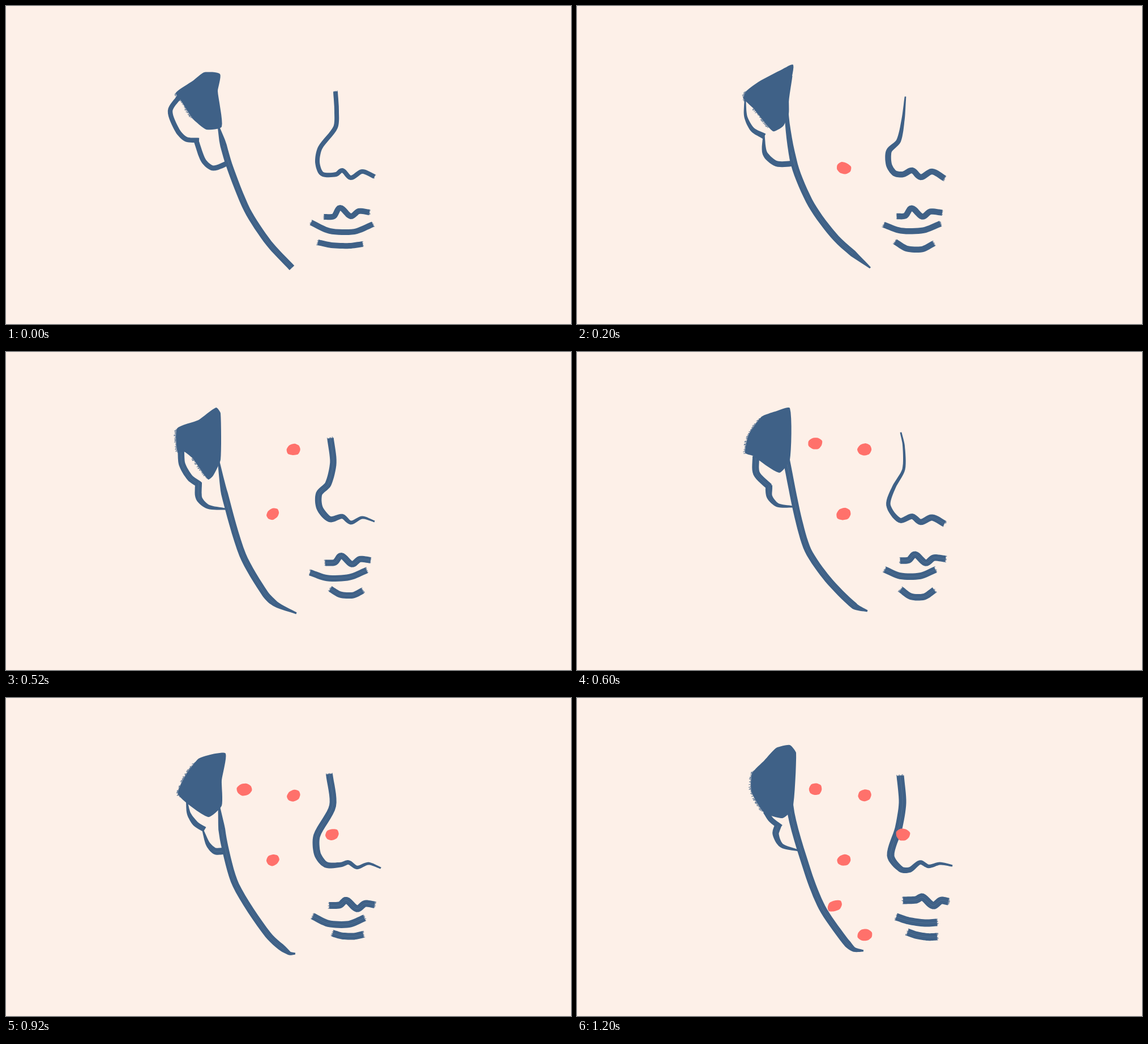
An HTML page that plays this animation: 998 px wide and 561 px high, repeating every 1400 ms.

```html
<!DOCTYPE html>
<html lang="en">
<head>
<meta charset="utf-8">
<title>Brush portrait</title>
<style>
html, body { margin: 0; width: 100%; height: 100%; overflow: hidden; background: #fdf0e8; }
svg { display: block; width: 100%; height: 100%; }
</style>
</head>
<body>
<svg id="stage" viewBox="0 0 998 561"></svg>
<script>
const INK = '#3f6187', SPOT = '#ff716b', HOLD = 200;

// Key points of each redrawn pose. A stroke is [width, taper in, taper out, points].
// bow: left x, y, peak x. nostril: first crest x, tail y. lip and chin: both ends and sag.
const poses = [
  {
    hair: '300 153 330 132 350 117 378 120 374 150 381 213 354 218 330 199 308 165',
    ear: [[8.5, 0, 0, '306 160 290 185 303 220 318 235 341 237'], [9, 0, 0, '336 238 349 273 366 286 396 275']],
    jaw: [11.5, 30, 0, '375 212 394 280 426 360 464 418 505 462'],
    nose: [8, 0, 0, '582 151 584 185 582 214 555 250 550 275 558 296 583 297'],
    nostril: [594, 301], bow: [562, 372, 590], lip: [539, 382, 648, 385, 14], chin: [551, 417, 630, 420, 4]
  },
  {
    hair: '294 163 299 150 322 133 362 112 382 104 374 150 374 190 364 212 346 221 312 181',
    ear: [[10, 80, 0, '297 163 298 195 310 218 331 230'], [10, 40, 0, '330 226 332 260 352 278 381 278']],
    jaw: [12, 150, 40, '379 123 370 185 384 280 414 351 458 410 518 462'],
    nose: [10.5, 110, 0, '580 160 576 200 568 238 551 256 551 280 561 295 576 297'],
    nostril: [592, 304], bow: [565, 371, 591], lip: [542, 386, 642, 384, 11], chin: [562, 416, 630, 419, 11]
  },
  {
    hair: '302 135 340 120 371 98 379 108 379 190 366 218 357 225 330 188 315 176 303 177',
    ear: [[11.5, 0, 0, '309 174 311 198 325 222 342 234'], [12, 0, 60, '340 230 341 258 357 273 388 277']],
    jaw: [12, 60, 50, '375 190 386 250 418 358 458 427 477 445 513 461'],
    nose: [11.5, 0, 100, '573 152 578 195 569 233 553 250 554 275 572 295'],
    nostril: [594, 299], bow: [564, 372, 592], lip: [537, 389, 637, 385, 11], chin: [573, 418, 630, 421, 9]
  },
  {
    hair: '297 178 303 146 326 114 350 105 376 99 376 190 357 213 310 183',
    ear: [[12, 0, 0, '316 184 317 214 340 238'], [12, 0, 60, '339 235 340 255 354 270 381 273']],
    jaw: [12, 0, 25, '370 191 390 290 408 350 443 401 490 448 513 457'],
    nose: [11.5, 240, 0, '572 142 577 165 577 207 560 238 550 270 570 297'],
    nostril: [592, 303], bow: [571, 368, 597], lip: [544, 384, 633, 384, 11], chin: [572, 419, 631, 420, 12]
  },
  {
    hair: '304 170 318 135 340 107 365 99 388 98 381 145 381 190 357 210',
    ear: [[9.5, 40, 0, '319 180 323 204 335 222 351 232'], [12, 45, 0, '348 234 357 258 369 270 384 270']],
    jaw: [12, 40, 25, '376 190 385 255 406 330 463 418 500 450 511 451'],
    nose: [12, 0, 120, '571 134 577 190 549 243 550 275 565 294 592 294'],
    nostril: [605, 300], bow: [571, 366, 601], lip: [542, 385, 633, 388, 12], chin: [577, 415, 631, 417, 4]
  },
  {
    hair: '303 176 314 152 347 101 365 93 388 92 382 148 388 168 370 203 340 203',
    ear: [[10, 0, 25, '319 186 330 212 356 224'], [12.5, 0, 50, '349 224 357 251 383 265']],
    jaw: [12, 60, 0, '376 182 383 255 398 315 432 380 475 422 495 447'],
    nose: [12.5, 0, 120, '569 135 577 190 568 228 551 252 557 284 585 296'],
    nostril: [604, 294], bow: [577, 361, 610], lip: [556, 385, 632, 392, 3], chin: [583, 415, 632, 415, 4]
  },
  {
    hair: '308 165 309 133 331 110 352 88 376 83 387 97 381 195 363 212 330 202',
    ear: [[9.5, 0, 0, '333 200 343 215 360 228'], [12, 0, 60, '355 225 351 240 361 260 391 269']],
    jaw: [12.5, 90, 30, '385 96 376 190 408 308 433 370 470 424 488 443 506 446'],
    nose: [13, 0, 130, '571 137 575 185 568 230 554 278 572 302 588 303'],
    nostril: [606, 296], bow: [576, 357, 610], lip: [564, 386, 636, 396, 4], chin: [584, 413, 636, 421, 3]
  }
];

// One more mark joins with every pose.
const spots = [[471, 286], [508, 172], [421, 161], [576, 241], [508, 418], [455, 367]];

const points = text => text.match(/\d+ \d+/g).map(p => p.split(' ').map(Number));
const line = pts => pts.map(p => p[0].toFixed(1) + ' ' + p[1].toFixed(1)).join('L');
const dist = (a, b) => Math.hypot(b[0] - a[0], b[1] - a[1]);

function heading(a, b) {
  const len = dist(a, b) || 1;
  return [(b[0] - a[0]) / len, (b[1] - a[1]) / len];
}

function seeded(seed) {
  return () => (seed = (seed * 16807) % 2147483647) / 2147483647;
}

// Smooth curve whose tangents scale with each segment, so uneven spacing never overshoots.
function spline(pts, pull, closed) {
  const n = pts.length, out = [];
  const at = i => pts[closed ? (i + n) % n : Math.max(0, Math.min(n - 1, i))];
  for (let i = 0; i < (closed ? n : n - 1); i++) {
    const b = at(i), c = at(i + 1), reach = dist(b, c) * pull;
    const from = heading(at(i - 1), c), to = heading(b, at(i + 2));
    for (let u = 0; u < 1; u += 0.125) {
      const u2 = u * u, u3 = u2 * u, ease = 3 * u2 - 2 * u3;
      out.push([0, 1].map(k => b[k] + (c[k] - b[k]) * ease +
        reach * ((u3 - 2 * u2 + u) * from[k] + (u3 - u2) * to[k])));
    }
  }
  if (!closed) out.push(pts[n - 1]);
  return out;
}

function add(parent, tag, attrs) {
  const el = document.createElementNS('http://www.w3.org/2000/svg', tag);
  for (const key in attrs) el.setAttribute(key, attrs[key]);
  return parent.appendChild(el);
}

const bristles = (g, d) => add(g, 'path', { d, stroke: INK, 'stroke-width': 1.2, opacity: 0.8 });

function brush(g, width, taperIn, taperOut, keys, rand) {
  const pts = spline(keys, 0.8, false), last = pts.length - 1;
  const run = [0];
  for (let i = 1; i <= last; i++) run.push(run[i - 1] + dist(pts[i - 1], pts[i]));
  const press = (s, taper) => taper ? Math.min(1, 0.25 + 0.75 * s / taper) : 1;
  const widths = run.map(s => width * Math.min(press(s, taperIn), press(run[last] - s, taperOut)));
  const dirs = pts.map((p, i) => heading(pts[Math.max(0, i - 1)], pts[Math.min(last, i + 1)]));
  const edge = k => pts.map(([x, y], i) => [x - dirs[i][1] * widths[i] * k, y + dirs[i][0] * widths[i] * k]);
  add(g, 'path', { d: 'M' + line(edge(0.5)) + 'L' + line(edge(-0.5).reverse()) + 'Z', fill: INK });

  // Dry trace where the brush is pressed wide.
  const wide = pts.filter((p, i) => widths[i] > 10.5);
  if (wide.length) add(g, 'path', { d: 'M' + line(wide), fill: 'none', stroke: '#7890ab', 'stroke-width': 0.8, opacity: 0.4 });

  if (!rand) return;
  let hairs = '';
  for (const [i, sign] of [[0, -1], [last, 1]]) {
    const [x, y] = pts[i], [dx, dy] = dirs[i], half = widths[i] / 2;
    for (let o = 0.7 - half; o < half; o += 1.5) {
      const reach = sign * rand() * half * 0.4;
      hairs += `M${x - dy * o} ${y + dx * o}l${dx * reach} ${dy * reach}`;
    }
  }
  bristles(g, hairs);
}

// Filled hair whose left-facing edge frays outward.
function hair(g, text, rand) {
  const pts = spline(points(text), 0.5, true);
  add(g, 'path', { d: 'M' + line(pts) + 'Z', fill: INK });
  let d = '';
  pts.forEach((a, i) => {
    const b = pts[(i + 1) % pts.length], [dx, dy] = heading(a, b);
    if (dy > -0.75) return;
    for (let s = 0; s < dist(a, b); s += 1.8) d += `M${a[0] + dx * s} ${a[1] + dy * s}l${-rand() * 4} ${rand()}`;
  });
  bristles(g, d);
}

function bow([x, y, peak], i) {
  const top = y - 16 + 1.7 * i;
  return [[x, y], [peak - 11, y - 1], [peak, top], [peak + 19, top + 15], [peak + 33, top + 6], [x + 80, top + 8]];
}

function sagging([x1, y1, x2, y2, sag]) {
  return [0, 0.3, 0.7, 1].map(u => [x1 + (x2 - x1) * u, y1 + (y2 - y1) * u + (u % 1 ? sag : 0)]);
}

const nostril = ([x, y], i) => [[x, 290], [x + 15, 303 - i], [x + 35, 292], [x + 57, y]];

// Rounded dab with a wobbling edge.
function spot(g, [x, y], rand) {
  const w = 10.5 + rand() * 3, h = 8.5 + rand() * 2, turn = (rand() - 0.7) * 0.8;
  const rim = Array.from({ length: 8 }, (_, k) => {
    const a = (k + 0.5) * Math.PI / 4, r = 1 + rand() * 0.16;
    const px = Math.cos(a) * w * r, py = Math.sin(a) * h * r;
    return [x + px * Math.cos(turn) - py * Math.sin(turn), y + px * Math.sin(turn) + py * Math.cos(turn)];
  });
  add(g, 'path', { d: 'M' + line(spline(rim, 0.7, true)) + 'Z', fill: SPOT });
}

const stage = document.getElementById('stage');

const layers = poses.map((pose, i) => {
  const g = add(stage, 'g', { visibility: 'hidden' }), rand = seeded(977 + i * 131);
  for (const [w, a, b, text] of [...pose.ear, pose.jaw]) brush(g, w, a, b, points(text));
  hair(g, pose.hair, rand);
  const [w, a, b, text] = pose.nose;
  brush(g, w, a, b, [...points(text), ...nostril(pose.nostril, i)], rand);
  const mouth = 10 + 0.5 * i;
  for (const keys of [bow(pose.bow, i), sagging(pose.lip), sagging(pose.chin)]) brush(g, mouth, 0, 0, keys, rand);
  spots.slice(0, i).forEach(p => spot(g, p, rand));
  return g;
});

function draw(time) {
  const now = Math.floor(time / HOLD) % layers.length;
  layers.forEach((g, i) => g.setAttribute('visibility', i === now ? 'visible' : 'hidden'));
}

const start = performance.now();
function tick() {
  draw(performance.now() - start);
  requestAnimationFrame(tick);
}
tick();
</script>
</body>
</html>
```
